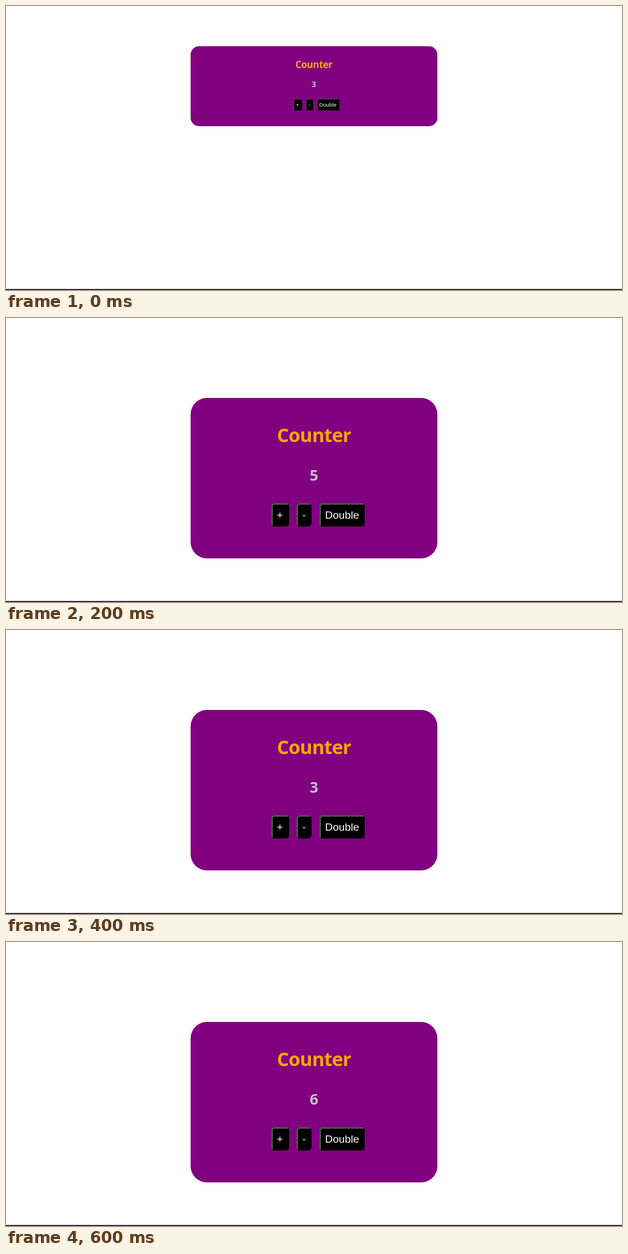
An HTML page for the animation above (0.8 s loop, 1101 px wide and 508 px high).

```html
<!DOCTYPE html>
<html lang="en">
<head>
<meta charset="utf-8">
<title>Counter</title>
<style>
  html, body { margin: 0; width: 100%; height: 100%; overflow: hidden; background: #fff; }
  .stage { position: relative; width: 1101px; height: 508px; overflow: hidden; }
  .stage::before, .stage::after { content: ""; position: absolute; left: 0; width: 100%; }
  .stage::before { top: 0; height: 1px; background: #f4f4f4; }
  .stage::after { top: 506px; height: 2px; background: linear-gradient(#4a4649 50%, #1f1b1e 50%); }

  .view, .view svg { position: absolute; inset: 0; }
  .card { position: absolute; left: 330px; width: 441px; background: #800080; }
  .btn {
    position: absolute; box-sizing: border-box; background: #000;
    border: solid; border-color: #505050 #000 #000 #505050;
  }
  text { text-anchor: middle; }
  .title, .num { font-family: "Open Sans", "Noto Sans", sans-serif; font-weight: 700; }
  .title { fill: #ffa500; }
  .num { fill: #c0c0c0; }
  .label { font-family: "Liberation Sans", Arial, sans-serif; fill: #fff; }

  .small .card { top: 72px; height: 143px; border-radius: 15px; }
  .small .btn { top: 166px; height: 21px; border-width: 1px; border-radius: 3px; }
  .small .title { font-size: 17px; letter-spacing: -.38px; }
  .small .num { font-size: 13.5px; }
  .small .label { font-size: 9.7px; }

  .large .card { top: 143px; height: 287px; border-radius: 29px; }
  .large .btn { top: 331px; height: 42px; border-width: 3px; border-radius: 6px; }
  .large .title { font-size: 34px; letter-spacing: -.77px; }
  .large .num { font-size: 27px; }
  .large .label { font-size: 19.2px; }

  .small, .large .num { animation: show .8s step-end infinite; }
  .large { animation: hide .8s step-end infinite; }
  .large .five { animation-delay: -.6s; }
  .large .three { animation-delay: -.4s; }
  .large .six { animation-delay: -.2s; }
  @keyframes show { 0% { opacity: 1 } 25%, 100% { opacity: 0 } }
  @keyframes hide { 0% { opacity: 0 } 25%, 100% { opacity: 1 } }
</style>
</head>
<body>
<div class="stage">
  <div class="view small">
    <div class="card"></div>
    <div class="btn" style="left:514px;width:15px"></div>
    <div class="btn" style="left:536px;width:13px"></div>
    <div class="btn" style="left:556px;width:40px"></div>
    <svg width="1101" height="508">
      <text class="title" x="550.3" y="111">Counter</text>
      <text class="num" x="550.3" y="145">3</text>
      <text class="label" x="521" y="179.5">+</text>
      <text class="label" x="542" y="179.5">-</text>
      <text class="label" x="575.2" y="179.5">Double</text>
    </svg>
  </div>
  <div class="view large">
    <div class="card"></div>
    <div class="btn" style="left:474px;width:32px"></div>
    <div class="btn" style="left:519px;width:27px"></div>
    <div class="btn" style="left:560px;width:81px"></div>
    <svg width="1101" height="508">
      <text class="title" x="550.3" y="222">Counter</text>
      <text class="num five" x="550.4" y="290.5">5</text>
      <text class="num three" x="550.4" y="290.5">3</text>
      <text class="num six" x="550.4" y="290.5">6</text>
      <text class="label" x="489.6" y="359">+</text>
      <text class="label" x="532.8" y="359">-</text>
      <text class="label" x="600.7" y="359">Double</text>
    </svg>
  </div>
</div>
</body>
</html>
```
